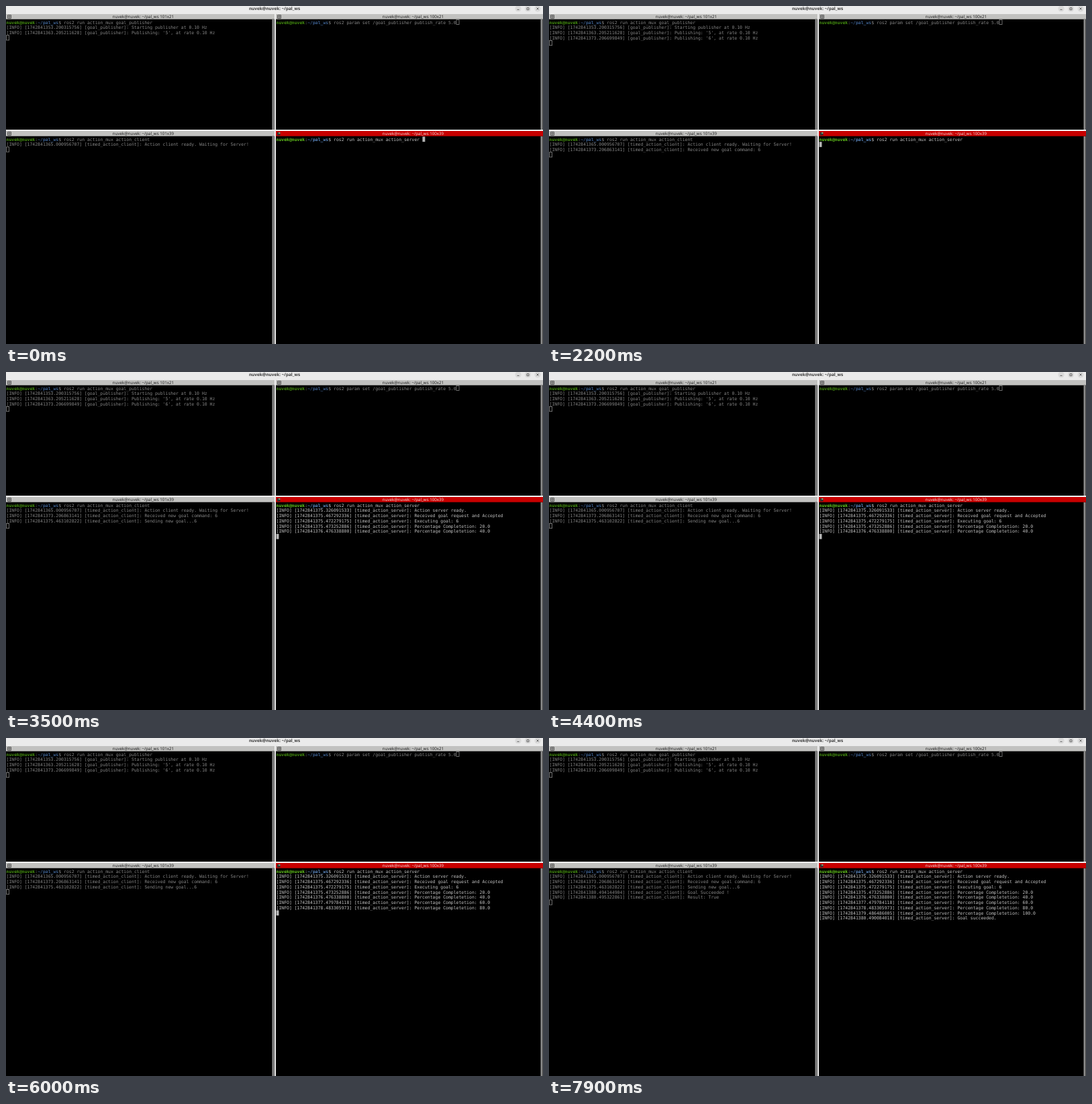
These frames come from a looping animation (800 px wide and 503 px high, 8 s). An HTML page:

```html
<!DOCTYPE html>
<html lang="en">
<head>
<meta charset="utf-8">
<title>Terminal panes</title>
<style>
html, body { margin: 0; width: 100%; height: 100%; overflow: hidden; background: #000; }
svg { display: block; width: 800px; height: 503px; }
text { white-space: pre; text-rendering: geometricPrecision; }
.mono { font: 6.46px "DejaVu Sans Mono", monospace; }
.bar { font: 6.2px "Open Sans", sans-serif; text-anchor: middle; }
.title { font: bold 6.4px "Open Sans", sans-serif; text-anchor: middle; fill: #3a3a3a; }
</style>
</head>
<body>
<svg id="stage" viewBox="0 0 800 503"></svg>
<script>
const CELL = 3.89, ROW = 7.76, LOOP = 8000;
const HOST = "nuvek@nuvek", DIR = "~/pal_ws";
const stage = document.getElementById("stage");

function add(tag, attrs, text, parent = stage) {
  const el = document.createElementNS("http://www.w3.org/2000/svg", tag);
  for (const k in attrs) el.setAttribute(k, attrs[k]);
  if (text) el.textContent = text;
  return parent.appendChild(el);
}
const rect = (x, y, width, height, fill) => add("rect", { x, y, width, height, fill });
const path = (d, stroke, width = 0.8) => add("path", { d, stroke, fill: "none", "stroke-width": width });

// Window title bar
rect(0, 0, 800, 12, "#ebebeb");
add("text", { x: 400, y: 6.1, class: "title" }, `${HOST}: ${DIR}`);
for (const cx of [763, 777.5, 792]) add("circle", { cx, cy: 4, r: 4.6, fill: "#dadada" });
path("M761.5 5.4h3M776 2.7h3v3h-3zM790.5 2.5l3 3m0-3l-3 3", "#4a4a4a");

// Dividers
rect(0, 184, 800, 2, "#f0f0f0");
rect(400, 12, 2, 491, "#f0f0f0");

const panes = [
  { x: 0, y: 12, end: 184, size: "101x21", cmd: "ros2 run action_mux goal_publisher",
    node: "goal_publisher", log: [
      ["53.200315756", "Starting publisher at 0.10 Hz"],
      ["63.205211628", "Publishing: '5', at rate 0.10 Hz"],
      ["73.206699849", "Publishing: '6', at rate 0.10 Hz"]] },
  { x: 402, y: 12, end: 184, size: "100x21", idle: true,
    cmd: "ros2 param set /goal_publisher publish_rate 5.0", log: [] },
  { x: 0, y: 186, end: 503, size: "101x39", cmd: "ros2 run action_mux action_client",
    node: "timed_action_client", log: [
      ["65.000956707", "Action client ready. Waiting for Server!"],
      ["73.206863141", "Received new goal command: 6"],
      ["75.463102822", "Sending new goal...6"],
      ["80.494144904", "Goal Succeeded !"],
      ["80.495322861", "Result: True"]] },
  { x: 402, y: 186, end: 503, size: "100x39", active: true, cmd: "ros2 run action_mux action_server",
    node: "timed_action_server", log: [
      ["75.326091533", "Action server ready."],
      ["75.467292336", "Received goal request and Accepted"],
      ["75.472279175", "Executing goal: 6"],
      ["75.473252886", "Percentage Completetion: 20.0"],
      ["76.476338800", "Percentage Completetion: 40.0"],
      ["77.479784118", "Percentage Completetion: 60.0"],
      ["78.483305973", "Percentage Completetion: 80.0"],
      ["79.486486005", "Percentage Completetion: 100.0"],
      ["80.490084018", "Goal succeeded."]] }
];

function build(p) {
  const [ink, user, dir] = p.active ? ["#c4c4c4", "#62c41c", "#5c88c0"] : ["#868686", "#459010", "#3c6090"];
  const width = p.x ? 398 : 400, left = p.x + 0.5;
  const line = row => add("text", { x: left, y: p.y + 14.6 + row * ROW, class: "mono", fill: ink });

  rect(p.x, p.y, width, 7.7, p.active ? "#c80000" : "#c2c2c0");
  add("text", { x: p.x + 204.5, y: p.y + 6, class: "bar", fill: p.active ? "#f4e4e4" : "#181818" },
    `${HOST}: ${DIR} ${p.size}`);
  if (p.active) {
    rect(404, p.y + 2, 4.5, 4.5, "#303030");
    rect(406, p.y + 2, 2.5, 2, "#78a078");
  } else {
    path(`M${p.x + 2.5} ${p.y + 1.5}h5v5h-5zm2.5 0v5m-2.5-2.5h5`, "#404040");
  }
  rect(p.x + width - 3.5, p.y + 8, 3, p.end - p.y - 8, "#8c8c8c");

  const prompt = line(0);
  add("tspan", { fill: user, "font-weight": "bold" }, HOST, prompt);
  add("tspan", {}, ":", prompt);
  add("tspan", { fill: dir, "font-weight": "bold" }, DIR, prompt);
  add("tspan", {}, "$ " + p.cmd, prompt);

  p.lines = p.log.map(([stamp, message], i) => {
    const el = line(i + 1);
    el.textContent = `[INFO] [17428413${stamp}] [${p.node}]: ${message}`;
    return { el, stamp: +stamp };
  });
  p.cursor = add("rect", p.active
    ? { width: 3.9, height: 7.7, fill: "#b4b4b4" }
    : { width: 4, height: 7.2, fill: "none", stroke: "#868686", "stroke-width": 0.8 });
}

function draw(now) {
  const t = Math.floor(now % LOOP / 100) * 100;
  const clock = 73.02 + t / 1000;
  for (const p of panes) {
    let shown = 0;
    for (const { el, stamp } of p.lines) {
      const on = stamp <= clock;
      el.style.display = on ? "" : "none";
      shown += on;
    }
    // The cursor waits after the command until it is entered
    const typing = p.idle || p.active && t < 200;
    const col = typing ? 22 + p.cmd.length + (p.active ? 1 : 0) : 0;
    const row = typing ? 0 : shown + 1;
    p.cursor.setAttribute("x", p.x + 0.6 + col * CELL);
    p.cursor.setAttribute("y", p.y + 8.4 + row * ROW);
    if (p.active) p.cursor.style.display = (t + 400) % 1200 < 600 ? "" : "none";
  }
}

panes.forEach(build);
const start = performance.now();
function tick() {
  draw(performance.now() - start);
  requestAnimationFrame(tick);
}
tick();
</script>
</body>
</html>
```
